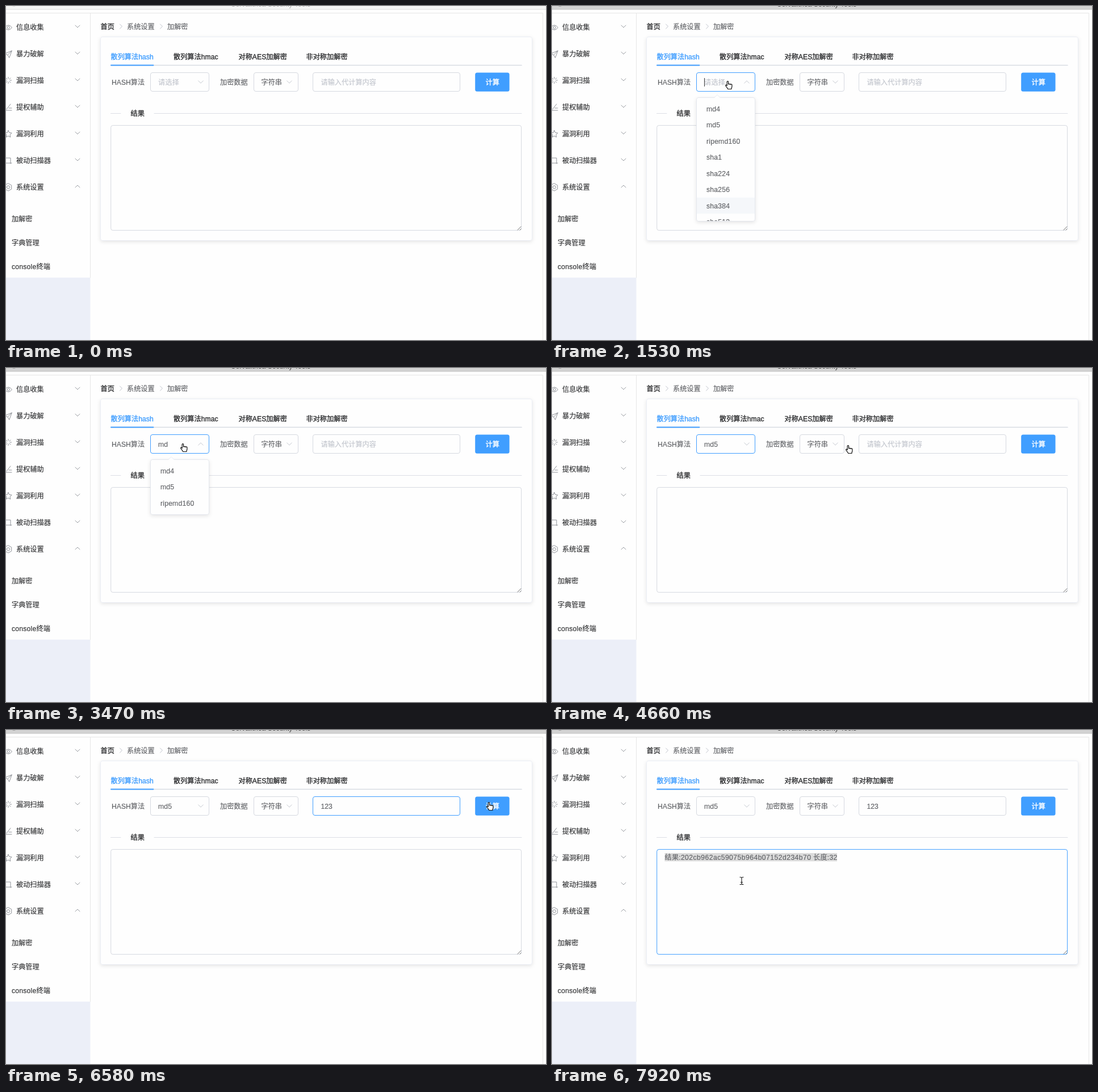
These frames come from a looping animation (951 by 589 pixels, 8 s). An HTML page:

```html
<!DOCTYPE html>
<html lang="zh-CN">
<head>
<meta charset="utf-8">
<style>
html, body { margin: 0; width: 100%; height: 100%; overflow: hidden; background: #fefefe; }
svg { display: block; width: 951px; height: 589px; }
text { font: 12.2px "Liberation Sans", "Noto Sans CJK SC", "Noto Sans CJK", sans-serif; white-space: pre; }
.label { stroke: currentColor; stroke-width: .15px; }
.medium { stroke-width: .38px; }
.latin { letter-spacing: .2px; }
.hash { letter-spacing: .44px; }
.line { fill: none; stroke-linecap: round; stroke-linejoin: round; }
.card { filter: drop-shadow(0 2px 3px rgba(0, 0, 0, .1)); }
</style>
</head>
<body>
<svg id="stage" viewBox="0 0 951 589"></svg>
<script>
const DARK = '#303133', TEXT = '#606266', PALE = '#c0c4cc', BLUE = '#409eff', EDGE = '#d6d9e0', ICON = '#909399';

const label = (x, y, s, color = TEXT, cls = '', id = '') =>
  `<text id="${id}" x="${x}" y="${y + 4.5}" fill="currentColor" color="${color}" class="label ${cls}">${s}</text>`;
const line = (d, color = EDGE, w = 1, id = '') =>
  `<path id="${id}" class="line" d="${d}" stroke="${color}" stroke-width="${w}"/>`;
const block = (x, y, w, h, fill, id = '') =>
  `<rect id="${id}" x="${x}" y="${y}" width="${w}" height="${h}" fill="${fill}"/>`;
const box = (x, y, w, h, id = '', edge = EDGE, cls = '') =>
  `<rect id="${id}" class="${cls}" x="${x + .5}" y="${y + .5}" width="${w}" height="${h}" rx="3.5" fill="#fefefe" stroke="${edge}"/>`;
const chevron = (x, y, up, r = 4, color = PALE, id = '') => {
  const h = (up ? -r : r) / 2;
  return line(`M${x - r} ${y - h}L${x} ${y + h}L${x + r} ${y - h}`, color, .9, id);
};
const ring = (n, fn) => Array.from({ length: n }, (_, i) => fn(i * 2 * Math.PI / n - Math.PI / 2, i));
const at = (a, r, x, y) => `${(x + r * Math.cos(a)).toFixed(1)} ${(y + r * Math.sin(a)).toFixed(1)}`;
const circle = (x, y, r) => `M${x - r} ${y}a${r} ${r} 0 1 0 ${2 * r} 0a${r} ${r} 0 1 0 ${-2 * r} 0`;

const icons = [
  'M-2 38Q4 29.5 10.5 38Q4 46.5 -2 38Z' + circle(4.2, 38, 2.2),
  'M10 79L-2 84L3 86.5L5.5 91ZM3 86.5L10 79',
  ring(8, a => `M${at(a, 2.8, 4, 131)}L${at(a, 5.6, 4, 131)}`).join(''),
  'M1 182L8 173M0 184H10M5 180H10',
  'M' + ring(10, (a, i) => at(a, i % 2 ? 3.2 : 6.5, 4, 226)).join('L') + 'Z',
  'M-2 268H8V278M-2 277H10',
  'M' + ring(6, a => at(a, 6.6, 4, 319.5)).join('L') + 'Z' + circle(4, 319.5, 2.7)
];
const menu = ['信息收集', '暴力破解', '漏洞扫描', '提权辅助', '漏洞利用', '被动扫描器', '系统设置'];
const options = ['md4', 'md5', 'ripemd160', 'sha1', 'sha224', 'sha256', 'sha384', 'sha512'];
const ROW = 28.5;

const sidebar = () =>
  menu.map((s, i) => {
    const y = 37 + i * 47;
    return line(icons[i], ICON) + label(18, y, s, DARK) + chevron(126, y - 1, i === 6, 4, ICON);
  }).join('') +
  ['加解密', '字典管理', 'console终端'].map((s, i) => label(10, 375 + i * 42, s, DARK, i === 2 ? 'latin' : '')).join('') +
  block(0, 479, 148.5, 110, '#eceff8');

const page = () =>
  block(0, 0, 951, 6, '', 'bar') + line('M0 6H951', '#cfcfcf', 1, 'barEdge') +
  '<circle id="dot" cx="14" cy="-4" r="5"/>' +
  '<text id="title" x="466" y="1.3" text-anchor="middle">Corvalithea Security Tools</text>' +
  line('M0 12.5H945.5V589M148.5 13V479', '#e6e6e6') + sidebar() +
  label(166.5, 36, '首页', DARK, 'medium') + label(213, 36, '系统设置') + label(284, 36, '加解密') +
  line('M200.5 32L204.5 36L200.5 40M271.5 32L275.5 36L271.5 40', PALE) +
  box(166, 54, 760, 359, '', '#ebeef5', 'card') +
  line('M184.5 104.5H908', '#d8dbe2', 1.5) + line('M185 104.5H259.5', BLUE, 1.8) +
  label(184.5, 89, '散列算法hash', BLUE, 'medium') + label(295, 89, '散列算法hmac', DARK, 'medium') +
  label(409.5, 89, '对称AES加解密', DARK, 'medium') + label(528.5, 89, '非对称加解密', DARK, 'medium') +
  label(186, 134, 'HASH算法') + label(377, 134, '加密数据') +
  box(254, 117, 103, 33, 'select') + label(268, 134, '', TEXT, 'latin', 'choice') +
  chevron(343, 134, false, 4.3, PALE, 'down') + chevron(343, 134, true, 4.3, PALE, 'up') +
  box(436, 117, 78, 33) + label(449.5, 134, '字符串') + chevron(499, 134, false, 4.3) +
  box(540, 117, 259, 33, 'input') + label(554.5, 134, '', TEXT, '', 'entry') +
  `<rect x="826.2" y="117.4" width="60.4" height="33.3" rx="3.5" fill="${BLUE}"/>` + label(844.5, 134, '计算', '#fff', 'medium') +
  line('M184.5 189.5H202M261 189.5H908', '#dcdfe6') + label(219.5, 189, '结果', DARK, 'medium') +
  box(184.2, 210.1, 722.9, 185, 'area') + line('M901 395L907 389M905 395L907 393', '#777') +
  block(198.5, 217, 303.5, 14.5, '#dbdbdb', 'mark') +
  label(198.5, 224.5, '结果:<tspan class="hash">202cb962ac59075b964b07152d234b70</tspan> 长度:32', TEXT, 'latin', 'result');

const dropdown = () =>
  '<clipPath id="clip"><rect id="clipBox" x="254" y="161" width="104"/></clipPath><g id="drop">' +
  box(254, 161, 103, 218, 'panel', '#e4e7ed', 'card') +
  '<path d="M286 162L291 156.5L296 162Z" fill="#fefefe"/>' + line('M286 161.5L291 156.5L296 161.5', '#ebeef5') +
  '<g clip-path="url(#clip)">' + block(255, 0, 102, ROW, '#f5f7fa', 'hover') +
  options.map((s, i) => label(272, 181 + i * ROW, s, TEXT, 'latin')).join('') + '</g></g>';

const pointers = () =>
  line('', DARK, 1, 'caret') +
  '<path id="hand" fill="#fff" stroke="#111" stroke-width="1.2" stroke-linejoin="round" d="M3.2 8.5V1.8a1.2 1.2 0 0 1 2.4 0V6a1.1 1.1 0 0 1 2.1.2 1.1 1.1 0 0 1 2.1.4 1.1 1.1 0 0 1 2.1.9V10c0 1.5-1 2.3-1 4.5H4.7C4.5 12.5 1.8 10.8.7 8.4.3 7.2 1.6 6.7 2.3 7.5Z"/>' +
  '<g id="beam">' + ['#fff', '#111'].map((c, i) =>
    line('M-3 -6.5Q0 -6.5 0 -5Q0 -6.5 3 -6.5M0 -5V5M-3 6.5Q0 6.5 0 5Q0 6.5 3 6.5M-1.5 2.5H1.5', c, i ? 1.1 : 2.4)).join('') + '</g>';

const stage = document.getElementById('stage');
stage.innerHTML = page() + dropdown() + pointers();
const el = id => document.getElementById(id);
const set = (id, attrs) => { for (const k in attrs) el(id).setAttribute(k, attrs[k]); };
const show = (id, on) => { el(id).style.display = on ? '' : 'none'; };
const fillIn = (id, value, hint) => {
  el(id).textContent = value || hint;
  set(id, { color: value ? TEXT : PALE });
};

// Changes by tick; each entry keeps the values before it.
const steps = [
  [-1, { active: false, focus: '', choice: '', entry: '', open: 0, rows: 8, hover: -1, caret: 0, result: false, mark: false }],
  [0, { active: true, focus: 'area' }],
  [5, { focus: 'select' }],
  [6, { open: .5, hover: 6 }],
  [7, { open: 1, caret: 268.5 }],
  [8, { caret: 0 }],
  [11, { caret: 268.5 }],
  [15, { choice: 'm', caret: 279.5 }],
  [16, { choice: 'md', caret: 286.5, rows: 3, hover: -1 }],
  [20, { caret: 0 }],
  [22, { hover: 1 }],
  [24, { choice: 'md5', open: .6 }],
  [25, { open: 0 }],
  [32, { focus: 'input', caret: 555.5 }],
  [36, { entry: '1', caret: 562.5 }],
  [37, { entry: '123', caret: 575.5 }],
  [41, { caret: 0 }],
  [43, { result: true }],
  [47, { focus: 'area' }],
  [49, { mark: true }]
];
// tick, x, y, shape
const path = [
  [-1, 420, 300, ''], [0, 420, 300, 'beam'], [2, 350, 205, 'hand'], [4, 305, 132, 'hand'], [7, 305, 132, 'hand'],
  [8, 307, 133, 'hand'], [20, 307, 133, 'hand'], [23, 288, 206, 'hand'], [24, 288, 206, 'hand'],
  [27, 461, 150, 'hand'], [28, 517, 136, 'hand'], [30, 565, 152, 'beam'], [32, 604, 133, 'beam'],
  [36, 604, 133, ''], [39, 660, 136, 'hand'], [41, 846, 127, 'hand'], [43, 846, 127, 'hand'],
  [45, 560, 215, 'beam'], [48, 334, 266, 'beam'], [51, 334, 266, 'beam']
];

function pointerAt(tick) {
  const i = path.findLastIndex(p => p[0] <= tick);
  const a = path[i], b = path[i + 1] || a;
  const f = a === b ? 0 : (tick - a[0]) / (b[0] - a[0]);
  return [a[1] + (b[1] - a[1]) * f, a[2] + (b[2] - a[2]) * f, a[3]];
}

function render(tick) {
  const s = Object.assign({}, ...steps.filter(e => e[0] <= tick).map(e => e[1]));
  set('bar', { fill: s.active ? '#d3d3d3' : '#f5f5f5' });
  set('barEdge', { stroke: s.active ? '#c2c2c2' : '#dcdcdc' });
  set('dot', { fill: s.active ? '#9b9b9b' : '#d8d8d8' });
  set('title', { fill: s.active ? '#444' : '#aaa' });
  for (const id of ['select', 'input', 'area']) set(id, { stroke: s.focus === id ? BLUE : EDGE });
  fillIn('choice', s.choice, '请选择');
  fillIn('entry', s.entry, '请输入代计算内容');

  const height = s.rows > 3 ? 218 : 97;
  set('drop', { opacity: s.open });
  set('panel', { height });
  set('clipBox', { height });
  set('hover', { y: 166.7 + s.hover * ROW });
  show('hover', s.hover >= 0);
  show('up', s.open === 1);
  show('down', s.open < 1);
  show('result', s.result);
  show('mark', s.mark);
  show('caret', s.caret);
  set('caret', { d: `M${s.caret} 127.5V141.5` });

  const [x, y, shape] = pointerAt(tick);
  for (const id of ['hand', 'beam']) {
    show(id, id === shape);
    set(id, { transform: `translate(${x.toFixed(1)} ${y.toFixed(1)})` });
  }
}

const LOOP = 8000, START = 492, TICK = 148.4;
const origin = performance.now();
let last = null;
function frame() {
  const t = (performance.now() - origin) % LOOP;
  const tick = Math.max(-1, Math.floor((t - START) / TICK));
  if (tick !== last) render(last = tick);
  requestAnimationFrame(frame);
}
frame();
</script>
</body>
</html>
```
